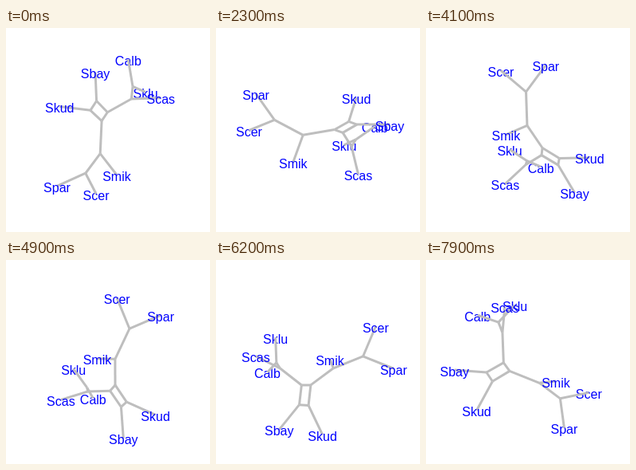
Animation, 256 px wide and 256 px high, one loop 8000 ms. Source, as an HTML page with a canvas:

```html
<!DOCTYPE html>
<html lang="en">
<head>
<meta charset="utf-8">
<title>Rotating split network</title>
<style>
html, body { margin: 0; width: 100%; height: 100%; overflow: hidden; background: #fff; }
canvas { display: block; width: 256px; height: 256px; }
</style>
</head>
<body>
<canvas id="stage" width="256" height="256"></canvas>
<script>
const ctx = document.getElementById('stage').getContext('2d');

const LOOP = 8000, STEP = 100;
const SPIN = 36 * Math.PI / 180;   // radians per second
const TILT = 20 * Math.PI / 180;
const MID = 128;
const EYE = MID / Math.tan(15 * Math.PI / 180);  // 30 degree field of view

// x right, y down, z towards the viewer
const nodes = {
  Calb: [27, -78.1, -62],
  Sklu: [52.2, -31.9, -67],
  Scas: [63, -44.1, 9],
  Sbay: [-13.5, -82.5, 47],
  Skud: [-51.9, -47.6, 57],
  Smik: [9.7, 28.8, 67],
  Scer: [-15.4, 82.5, 14.5],
  Spar: [-63.1, 62.9, 30],
  boxBay: [-13, -47, 33],
  boxCas: [-0.6, -30, 21.5],
  boxMik: [-7.4, -20.7, 26],
  boxKud: [-19.8, -37.7, 39],
  casFork: [28.6, -39.7, -2],
  albFork: [32, -47.8, -33],
  mikFork: [-9.2, 16.3, 36.5],
  parFork: [-27.8, 48, 24.5]
};

const edges = [
  ['boxBay', 'boxCas'], ['boxCas', 'boxMik'], ['boxMik', 'boxKud'], ['boxKud', 'boxBay'],
  ['boxBay', 'Sbay'], ['boxKud', 'Skud'],
  ['boxCas', 'casFork'], ['casFork', 'Scas'], ['casFork', 'albFork'],
  ['albFork', 'Calb'], ['albFork', 'Sklu'],
  ['boxMik', 'mikFork'], ['mikFork', 'Smik'], ['mikFork', 'parFork'],
  ['parFork', 'Scer'], ['parFork', 'Spar']
];

const labels = Object.keys(nodes).filter(name => /^[SC]/.test(name));

function project([x, y, z], angle) {
  const c = Math.cos(angle), s = Math.sin(angle);
  const rx = x * c - y * s, ry = x * s + y * c;
  const depth = z * Math.cos(TILT) - ry * Math.sin(TILT);
  const k = EYE / (EYE - depth);
  return {
    x: MID + k * rx,
    y: MID + k * (ry * Math.cos(TILT) + z * Math.sin(TILT)),
    depth
  };
}

function drawEdge(a, b) {
  ctx.beginPath();
  ctx.moveTo(a.x, a.y);
  ctx.lineTo(b.x, b.y);
  ctx.stroke();
}

function draw(ms) {
  const angle = SPIN * ms / 1000;
  const pts = {};
  for (const name in nodes) pts[name] = project(nodes[name], angle);

  const items = edges.map(([from, to]) => {
    const a = pts[from], b = pts[to];
    return { depth: (a.depth + b.depth) / 2, paint: () => drawEdge(a, b) };
  });
  for (const name of labels) {
    const p = pts[name];
    items.push({ depth: p.depth, paint: () => ctx.fillText(name, p.x, p.y + 7.5) });
  }
  items.sort((a, b) => a.depth - b.depth);

  ctx.fillStyle = '#fff';
  ctx.fillRect(0, 0, 256, 256);
  ctx.strokeStyle = '#bebebe';
  ctx.lineWidth = 3;
  ctx.fillStyle = '#00f';
  ctx.font = '16px "Liberation Sans", Arial, sans-serif';
  ctx.textAlign = 'center';
  for (const item of items) item.paint();
}

const start = performance.now();
function tick() {
  const t = (performance.now() - start) % LOOP;
  draw(Math.floor(t / STEP) * STEP);
  requestAnimationFrame(tick);
}
tick();
</script>
</body>
</html>
```
